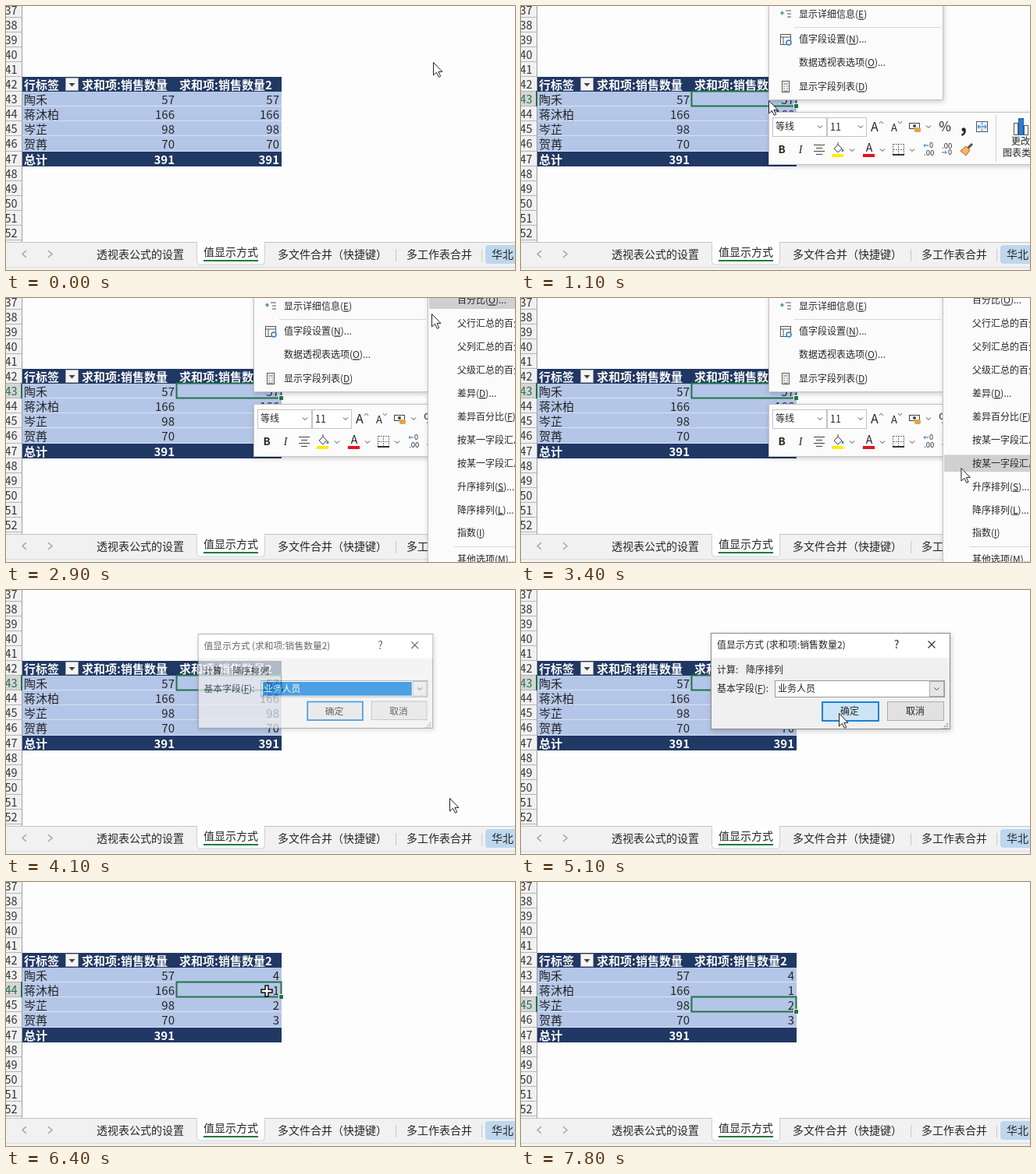
An HTML page for the animation above (8.2 s loop, 652 px wide and 339 px high).

```html
<!DOCTYPE html>
<html lang="zh-CN">
<meta charset="utf-8">
<style>
  html, body { margin: 0; height: 100%; overflow: hidden; background: #fdfdfd; }
  svg { display: block; width: 652px; height: 339px; }
  text { font-family: "Noto Sans CJK SC", "Noto Sans CJK", sans-serif; white-space: pre; }
  .shadow { filter: drop-shadow(1px 2px 3px #0003); }
</style>
<body>
<script>
const INK = '#262626', GREEN = '#217346', NAVY = '#203864';
const rect = (x, y, w, h, fill, more = '') =>
  `<rect x="${x}" y="${y}" width="${w}" height="${h}" fill="${fill}" ${more}/>`;
const box = (x, y, w, h, fill, stroke, more = '') =>
  rect(x + .5, y + .5, w - 1, h - 1, fill, `stroke="${stroke}" ${more}`);
const path = (d, stroke, more = '') => `<path d="${d}" fill="none" stroke="${stroke}" ${more}/>`;
// y is the vertical centre of the line; access keys such as (E) get underlined
const text = (x, y, s, size = 12, fill = INK, more = '') =>
  `<text x="${x}" y="${y + size * .37}" font-size="${size}" fill="${fill}" ${more}>` +
  String(s).replace(/\(([A-Z])\)/, '(<tspan text-decoration="underline">$1</tspan>)') + '</text>';
const group = (id, body) => `<g id="${id}">${body}</g>`;
const chevron = (x, y) => path(`M${x - 3} ${y - 1.5}l3 3 3-3`, '#444');
const END = ' text-anchor="end"', MID = ' text-anchor="middle"', BOLD = ' font-weight="700"';

const rowTop = n => Math.round(91 + (n - 42) * 19.1);
const rowMid = n => rowTop(n) + 10;

function sheet() {
  let s = rect(0, 0, 20, 304, '#f1f1f1');
  for (let n = 37; n <= 52; n++)
    s += text(14.5, rowMid(n), n, 14.5, '#333', END) + rect(0, rowTop(n + 1) - 1, 20, 1, '#b5b5b5');
  s += rect(20, 0, 1, 304, '#a0a0a0') + group('rowMark', '');

  s += rect(21, 91, 332, 115, NAVY) + rect(21, 110, 332, 77, '#b4c6e7');
  for (let n = 43; n < 47; n++) s += rect(21, rowTop(n + 1) - 1, 332, 1, '#d6e1f3');
  const head = (x, n, str, more = '') => text(x, rowMid(n), str, 15, '#fff', BOLD + more);
  const column = (x, list, more = '') => list.map((v, i) => text(x, rowMid(43 + i), v, 15, INK, more)).join('');
  const sales = [57, 166, 98, 70];
  s += head(23, 42, '行标签') + head(97, 42, '求和项:销售数量') + head(222, 42, '求和项:销售数量2');
  s += box(76, 92, 17, 17, '#f4f4f4', '#a6a6a6') + '<path d="M80.5 99h8l-4 4.5z" fill="#444"/>';
  s += column(23, ['陶禾', '蒋沐柏', '岑芷', '贺苒']) + column(216, sales, END);
  s += head(23, 47, '总计') + head(216, 47, '391', END);
  s += group('sums', column(350, sales, END) + head(350, 47, '391', END));
  s += group('ranks', column(350, [4, 1, 2, 3], END));
  return s + group('pick', box(218, 0, 135, 20, 'none', GREEN, 'stroke-width="2"') +
    rect(349, 16, 6, 6, '#fff') + rect(350, 17, 5, 5, GREEN));
}

function tabs() {
  let s = rect(0, 303, 652, 36, '#f1f1f1') + rect(0, 303, 652, 1, '#c4c4c4') + rect(0, 335, 652, 1, '#dcdcdc');
  s += path('M26 314l-5 4.5 5 4.5M54 314l5 4.5-5 4.5', '#a0a0a0', 'stroke-width="1.3"');
  s += '<path d="M244.5 303v25q0 4 4 4h79q4 0 4-4v-25z" fill="#fff" stroke="#d0d0d0"/>' + rect(245, 302, 86, 2, '#fdfdfd');
  s += rect(253, 326, 70, 2, '#107c41') + text(253, 316, '值显示方式', 14);
  s += text(116, 319, '透视表公式的设置', 14) + text(348, 319, '多文件合并（快捷键）', 14) + text(513, 319, '多工作表合并', 14);
  s += rect(499, 312, 1, 16, '#c8c8c8') + rect(609, 312, 1, 16, '#c8c8c8');
  return s + rect(614, 307, 50, 24, '#bdd7ee', 'rx="4"') + text(622, 319, '华北', 14);
}

const menuItems = [[11, '显示详细信息(E)'], [43, '值字段设置(N)...'], [73, '数据透视表选项(O)...'], [104, '显示字段列表(D)']];
function menu() {
  let s = box(317, -9, 224, 130, '#fbfbfb', '#c3c3c3', 'class="shadow"') + group('menuHover', '');
  s += rect(350, 27, 188, 1, '#d8d8d8');
  for (const [y, label] of menuItems) s += text(356, y, label);
  s += path('M332 9h5M334.5 6.5v5', '#107c41') + path('M339 6h7M341 10h5M341 14h5', '#555');
  s += box(332, 36, 14, 14, '#fff', '#555') + path('M332 40h14M336 40v10', '#555') +
    '<circle cx="343" cy="47" r="3" fill="#fff" stroke="#2b7cd3" stroke-width="1.5"/>';
  return s + box(334, 96, 10, 15, '#fff', '#555') + path('M336 100h6M336 103h2M340 103h2M336 106h2M340 106h2M336 109h6', '#666');
}

function toolbar() {
  let s = box(317, 136, 350, 68, '#fbfbfb', '#c3c3c3', 'class="shadow"');
  s += box(322, 143, 70, 25, '#fff', '#c3c3c3') + box(392, 143, 51, 25, '#fff', '#c3c3c3');
  s += text(326, 155, '等线') + text(396, 155, '11', 12.5);
  for (const [x, y] of [[383, 155], [435, 155], [522, 155], [424, 185], [463, 185], [501, 185]]) s += chevron(x, y);
  s += text(448, 155, 'A', 16) + path('M459 151l2.5-3 2.5 3', '#2b7cd3');
  s += text(474, 156, 'A', 13) + path('M483 148l2.5 3 2.5-3', '#2b7cd3');
  s += box(497, 150, 14, 8, '#fff', '#444') + '<circle cx="504" cy="154" r="2" fill="#444"/>' +
    rect(504, 156, 8, 6, '#e8a33d', 'rx="2"');
  s += text(543, 155, '%', 17, INK, MID) + text(567, 151, ',', 27, INK, MID + BOLD);
  s += box(583, 148, 15, 14, '#fff', '#555') + rect(584, 152, 13, 6, '#cfe4f7') +
    path('M590.5 148v4M590.5 158v4M585 155h11M587 153l-2 2 2 2M594 153l2 2-2 2', '#2b7cd3');
  s += text(334, 184, 'B', 13.5, INK, MID + BOLD);
  s += text(358, 184, 'I', 14, INK, MID + ` font-style="italic" style="font-family:'Liberation Serif',serif"`);
  s += path('M375 178.5h14M378 182.5h8M375 186.5h14M378 190.5h8', '#444');
  s += path('M401 183l5-5 5 5-5 5zM406 178v-3', '#444') + '<path d="M412 183q3 4 0 4t0-4" fill="#2b7cd3"/>' + rect(398, 190, 15, 4, '#ffee00');
  s += text(446, 182, 'A', 14, INK, MID) + rect(438, 190, 15, 4, '#e81123');
  s += path('M477 177.5h13M476.5 177v14M490.5 177v14M483.5 177v14M477 184.5h13', '#777', 'stroke-dasharray="2 1"') + rect(476, 190, 15, 2, '#333');
  s += text(516, 188, '.00', 9.5) + path('M522 179h-6M518 177l-2 2 2 2', '#2b7cd3') + text(523, 179, '0', 9);
  s += text(539, 179, '.00', 9.5) + path('M539 188h6M543 186l2 2-2 2', '#2b7cd3') + text(547, 188, '0', 9);
  s += path('M572 183l6-6', '#555', 'stroke-width="3"') + '<path d="M570 180l5 5-5 7-7-6z" fill="#f4b66a" stroke="#c55a11"/>';
  s += rect(608, 140, 1, 60, '#d0d0d0');
  s += box(631, 150, 6, 16, '#fff', '#555') + box(637, 144, 7, 22, '#2b7cd3', '#1f5fa8') + box(644, 153, 6, 13, '#fff', '#555');
  return s + text(628, 174, '更改') + text(617, 189, '图表类型');
}

const subY = i => 3 + i * 29.9;
function submenu() {
  const labels = ['百分比(O)...', '父行汇总的百分比(P)', '父列汇总的百分比(A)', '父级汇总的百分比(E)...', '差异(D)...',
    '差异百分比(F)...', '按某一字段汇总(R)...', '按某一字段汇总的百分比(U)...', '升序排列(S)...', '降序排列(L)...', '指数(I)'];
  return box(540, -9, 130, 360, '#fbfbfb', '#c3c3c3', 'class="shadow"') + group('subHover', rect(542, -11, 120, 22, '#d0d0d0')) +
    labels.map((v, i) => text(578, subY(i), v)).join('') +
    rect(574, 319, 90, 1, '#d8d8d8') + text(578, 336, '其他选项(M)...');
}

function dialog() {
  let s = box(243, 55, 307, 124, '#f0f0f0', '#8a8a8a', 'class="shadow"') + rect(244, 56, 305, 31, '#fff');
  s += text(251, 71, '值显示方式 (求和项:销售数量2)') + text(481, 70, '?', 14, INK, MID) + path('M521.5 65.5l9 9m0-9l-9 9', '#333', 'stroke-width="1.2"');
  s += text(251, 103, '计算:') + text(288, 103, '降序排列') + text(251, 127, '基本字段(F):');
  s += box(325, 116, 218, 22, '#fff', '#999') + rect(328, 118, 194, 18, '#0078d7', 'id="comboFill"');
  s += box(523, 117, 19, 20, '#e6e6e6', '#adadad') + chevron(532.5, 127) + text(329, 127, '业务人员', 12, INK, 'id="comboText"');
  s += rect(386, 144, 72, 24, '#e1e1e1', 'id="ok" stroke-width="1.8" stroke="#0078d7"') + text(421, 156, '确定', 12, INK, MID);
  s += box(469, 143, 73, 25, '#e1e1e1', '#adadad') + text(505, 156, '取消', 12, INK, MID);
  return s + path('M546 171v7M543 174v4M540 177v1', '#aaa', 'stroke-width="2" stroke-dasharray="2 1"');
}

const pointers =
  group('arrow', '<path d="M.5.5v16.5l3.9-3.7 2.9 6 2.4-1.1-2.8-5.8h5z" fill="#fff" stroke="#222"/>') +
  group('cross', '<path d="M-2-7h4v5h5v4h-5v5h-4v-5h-5v-4h5z" fill="#fff" stroke="#111" stroke-width="1.5"/>');

document.body.innerHTML = '<svg viewBox="0 0 652 339">' + sheet() + tabs() +
  group('popup', menu() + toolbar()) + group('sub', submenu()) + group('dialog', dialog()) + pointers + '</svg>';

const $ = id => document.getElementById(id);
const set = (id, name, value) => $(id).setAttribute(name, value);
const show = (id, opacity) => set(id, 'opacity', +opacity);

// pointer stops: time, x, y
const stops = [[0, 547, 72], [700, 330, 140], [800, 330, 140], [900, 317, 121], [1100, 317, 121], [1300, 322, 119],
  [1400, 322, 119], [2100, 420, -30], [2800, 545, -30], [2900, 545, 20], [3600, 568, 267], [4100, 568, 267],
  [4800, 407, 158], [5600, 407, 158], [5800, 418, 161], [6400, 334, 140], [6500, 334, 140], [6700, 332, 167],
  [7000, 332, 167], [7200, 336, 174], [7800, 664, 73], [8200, 664, 73]];
function pointerAt(t) {
  const i = stops.findIndex(s => s[0] > t);
  const [t0, x0, y0] = stops[i - 1], [t1, x1, y1] = stops[i];
  const p = (t - t0) / (t1 - t0), e = p * p * (3 - 2 * p);
  return [x0 + (x1 - x0) * e, y0 + (y1 - y0) * e];
}

function draw(t) {
  const [x, y] = pointerAt(t);
  const arrow = t < 100 || (t >= 900 && t < 5300);
  show('arrow', arrow);
  show('cross', !arrow);
  set('arrow', 'transform', `translate(${x} ${y})`);
  set('cross', 'transform', `translate(${x} ${y})`);

  const row = t < 600 ? 0 : t < 900 ? 44 : t < 6200 ? 43 : t < 7100 ? 44 : 45;
  show('pick', row > 0);
  set('pick', 'transform', `translate(0 ${rowTop(row) - 1})`);
  $('rowMark').innerHTML = row ? rect(0, rowTop(row), 20, 18, '#d5d5d5') + rect(19, rowTop(row) - 1, 2, 20, GREEN) +
    text(14.5, rowMid(row), row, 14.5, GREEN, END) : '';
  show('sums', t < 5300);
  show('ranks', t >= 5300);

  show('popup', t < 900 || t >= 4000 ? 0 : t < 1000 ? .5 : 1);
  const hovered = t >= 1400 && t < 2100 && menuItems.find(m => Math.abs(m[0] - y) < 14);
  $('menuHover').innerHTML = hovered ? rect(319, hovered[0] - 12, 220, 24, '#d0d0d0') : '';
  show('sub', t < 2300 || t >= 4000 ? 0 : t < 2400 ? .6 : 1);
  show('subHover', t >= 2900);
  set('subHover', 'transform', `translate(0 ${subY(Math.round((y - 8) / 29.9))})`);

  const open = t < 4000 ? 0 : t < 4100 ? .3 : t < 4200 ? .7 : t < 5300 ? 1 : t < 5400 ? .35 : 0;
  const scale = .94 + .06 * open;
  show('dialog', open);
  set('dialog', 'transform', `translate(396.5 117) scale(${scale}) translate(-396.5 -117)`);
  const pressed = t >= 5000;
  show('comboFill', !pressed);
  set('comboText', 'fill', pressed ? INK : '#fff');
  set('ok', 'fill', pressed ? '#cce4f7' : t >= 4700 ? '#e5f1fb' : '#e1e1e1');
}

// the picture advances in tenths of a second
const begin = performance.now();
(function tick() {
  draw(Math.floor(Math.max(0, performance.now() - begin) % 8200 / 100) * 100);
  requestAnimationFrame(tick);
})();
</script>
</body>
</html>
```
